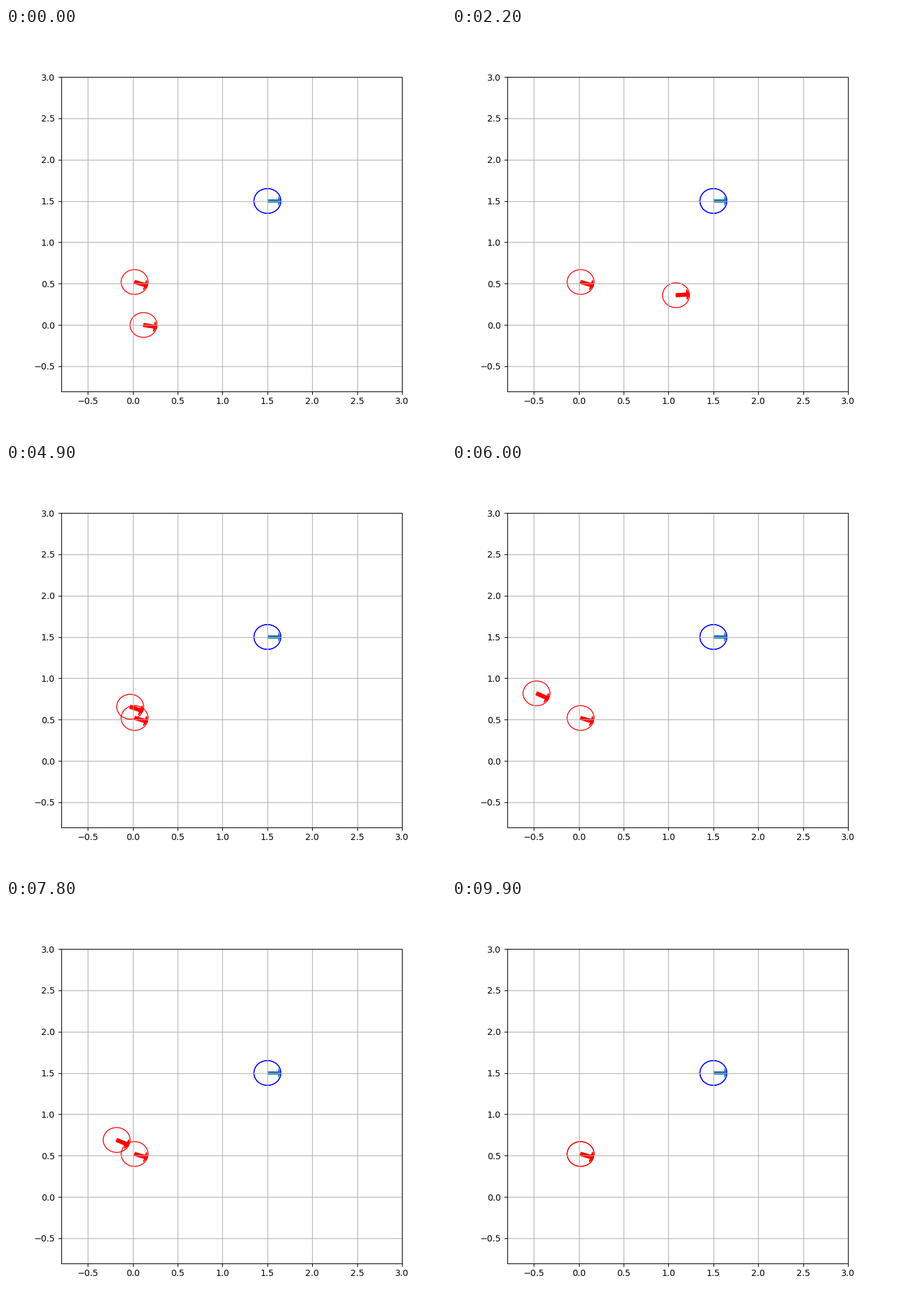
Write a matplotlib script that moves like this. It is 700 by 650 pixels and loops after 10000 ms.

```python
import numpy as np
import matplotlib.pyplot as plt
from matplotlib.animation import FuncAnimation
from matplotlib.patches import Arrow, Circle

FRAMES, STEP = 100, 100
RADIUS = 0.15
GOAL = (1.5, 1.5, 0.0)

# Key points of the shuttling motion, read by linear interpolation
KEY_T = [0, 0.4, 1.6, 2.2, 3.6, 4.9, 7.0, 8.7, 9.9]
CYCLES = [-1.75, -1.5, -0.5, 0, 1.174, 2.276, 4.5, 5.883, 6.667]
MID_Y = [0, 0, 0.03, 0.326, 0.623, 0.643, 0.802, 0.677, 0.489]
SLOPE = [-0.17, 0.55, 0.75, 0.07, -0.29, -0.38, -0.59, -0.31, -0.31]


def pose(t):
    """Back-and-forth swing along the heading, around a slowly drifting centre."""
    cycles, mid_y, slope = (np.interp(t, KEY_T, k)
                            for k in (CYCLES, MID_Y, SLOPE))
    turn = np.interp(t, [0, 7, 9.9], [0, 0.769, 1])
    mid_x = 0.12 + 0.48 * np.sin(2 * np.pi * turn)
    reach = 0.2 + 0.293 * np.exp(-((t - 1.9) / 1.7) ** 2)
    swing = reach * np.cos(2 * np.pi * cycles)
    return mid_x + swing, mid_y + slope * swing, np.arctan(slope)


fig, ax = plt.subplots(figsize=(7, 6.5), dpi=100)
ax.set_xlim(-0.8, 3.0)
ax.set_ylim(-0.8, 3.0)
ax.grid(True)


def add_robot(x, y, heading, edge, **arrow_style):
    circle = Circle((x, y), RADIUS, fill=False, edgecolor=edge)
    arrow = Arrow(x, y, RADIUS * np.cos(heading), RADIUS * np.sin(heading),
                  width=0.2, **arrow_style)
    return [ax.add_patch(circle), ax.add_patch(arrow)]


for _ in range(2):
    add_robot(*GOAL, "b")
add_robot(*pose((FRAMES - 1) * STEP / 1000), "r", color="r")

moving = []


def update(i):
    while moving:
        moving.pop().remove()
    moving.extend(add_robot(*pose(i * STEP / 1000), "r", color="r"))
    return moving


anim = FuncAnimation(fig, update, frames=FRAMES, interval=STEP,
                     init_func=lambda: moving, repeat=True, repeat_delay=0)
plt.show()
```
